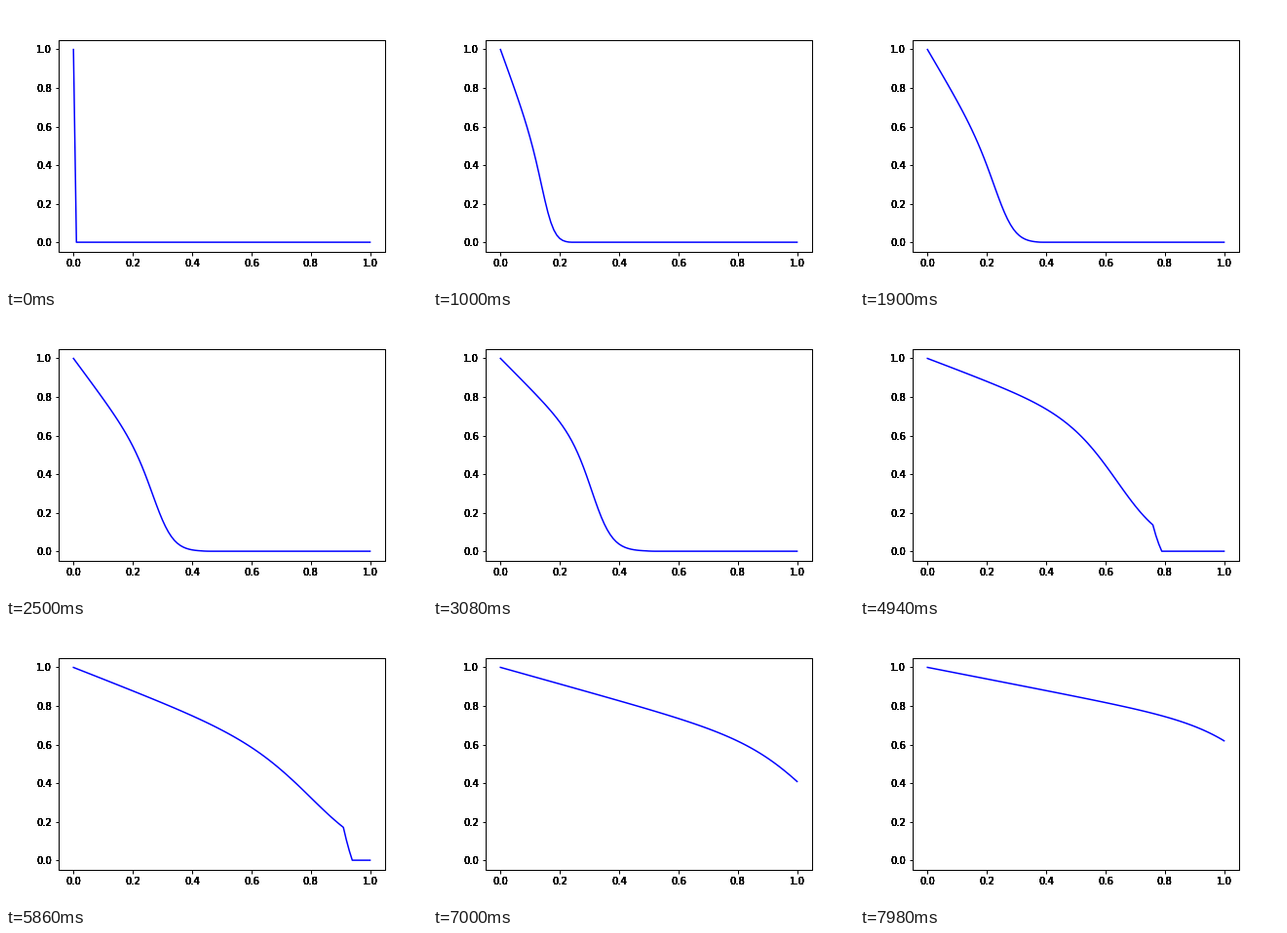
Recreate the animation shown at these times as a matplotlib script. Size 432 by 288 pixels, loop 8000 ms.

```python
import numpy as np
import matplotlib.pyplot as plt
from matplotlib.animation import FuncAnimation

STEP = 20        # ms per frame
FRAMES = 400
HOLD = 0.06      # seconds before the front starts to move
GROWN = 1.9      # seconds until the first, self-similar spread ends
COPIES = 8       # stacked labels, for their heavy edges

KEYS = [GROWN, 3.08, 4.94, 5.86, 7.0, 7.98]
grid = np.linspace(0, 1, 101)


def curve(t):
    """A sloping line times a soft step, ended by a sharp edge."""
    slope = np.interp(t, KEYS, [2.6, 1.55, 0.58, 0.6, 0.43, 0.3])
    center = np.interp(t, KEYS, [0.256, 0.322, 0.665, 0.855, 1.1, 1.22])
    edge = np.interp(t, KEYS, [0.4, 0.52, 0.79, 0.94, 1.12, 1.3])
    width = np.interp(t, [3.08, 5.86], [0.035, 0.108])

    # The early curve is the same shape squeezed towards the left wall.
    spread = np.clip((t - HOLD) / (GROWN - HOLD), 0, 1) ** 0.72
    x = grid / max(spread, 0.01)

    step = 0.5 * (1 + np.tanh((center - x) / (2 * width)))
    cut = np.clip((edge - x) / 0.03, 0, 1)
    return np.clip(1 - slope * x, 0, 1) * step * cut


plt.rcParams.update({"axes.linewidth": 1,
                     "xtick.major.width": 1, "ytick.major.width": 1})
fig = plt.figure(figsize=(6, 4), dpi=72, facecolor="white")
fig.subplots_adjust(left=0.125, right=0.9, bottom=0.125, top=0.88)
ax = fig.add_subplot()
ax.set(xlim=(-0.05, 1.05), ylim=(-0.05, 1.05))
ticks = np.linspace(0, 1, 6)
ax.set_xticks(ticks, [""] * len(ticks))
ax.set_yticks(ticks, [""] * len(ticks))
line, = ax.plot(grid, curve(0), color="blue", lw=1.5)

x_place, x_va, x_ha = ax.get_xaxis_text1_transform(7)
y_place, y_va, y_ha = ax.get_yaxis_text1_transform(7)
for _ in range(COPIES):
    for v in ticks:
        label = f"{v:.1f}"
        ax.text(v, 0, label, transform=x_place, va=x_va, ha=x_ha)
        ax.text(0, v, label, transform=y_place, va=y_va, ha=y_ha)


def draw(n):
    line.set_ydata(curve(n * STEP / 1000))
    return line,


anim = FuncAnimation(fig, draw, frames=FRAMES, interval=STEP,
                     repeat=True, repeat_delay=0)
plt.show()
```
